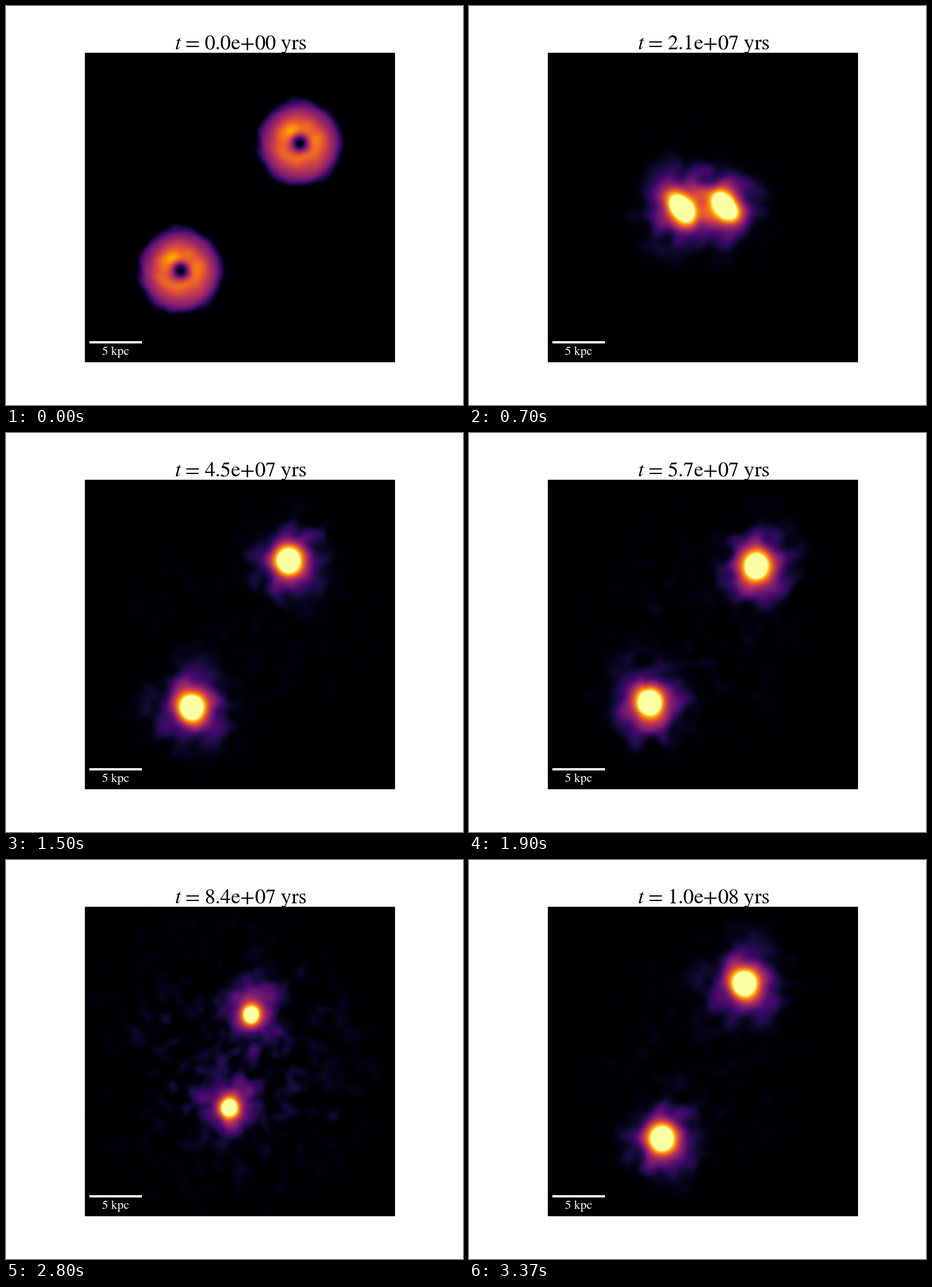
These frames come from a looping animation (800x700 px, 3530 ms). A matplotlib script:

```python
import numpy as np
import matplotlib.pyplot as plt
from matplotlib.animation import FuncAnimation

plt.rcParams["mathtext.fontset"] = "stix"

LOOP_MS, TICK_MS = 3530, 10
LEFT, TOP, SIDE = 138, 82, 543
CENTER = np.array([410.0, 353.0])

# Orbit: time in steps, lengths in pixels
FIRST_PASS, PERIOD = 7.35, 18.7
APOCENTRE, PERICENTRE = 157, 29
AXIS, PRECESSION = -128, -174.5

X, Y = np.meshgrid(LEFT + 0.5 + np.arange(SIDE), TOP + 0.5 + np.arange(SIDE))


def smooth_noise(seed, sigma):
    """Periodic noise with unit spread, smoothed over sigma pixels."""
    white = np.random.default_rng(seed).normal(size=(SIDE, SIDE))
    freq = np.fft.fftfreq(SIDE)
    decay = np.exp(-2 * (np.pi * sigma) ** 2 * (freq[:, None] ** 2 + freq ** 2))
    field = np.fft.ifft2(np.fft.fft2(white) * decay).real
    return field / field.std()


def noise_pair(seed, sigma):
    return smooth_noise(seed, sigma), smooth_noise(seed + 1, sigma)


DISK_NOISE = smooth_noise(4, 8)
HALO_NOISE = noise_pair(11, 10), noise_pair(21, 10)
HAZE_NOISE = noise_pair(31, 7)


def drift(pair, step, rate):
    return pair[0] * np.cos(rate * step) + pair[1] * np.sin(rate * step)


def follow(field, pos):
    col, row = np.round(pos - (LEFT, TOP)).astype(int)
    return np.roll(field, (row, col), (0, 1))


def passage(step):
    """Index of the nearest close pass and the time since it."""
    index = round((step - FIRST_PASS) / PERIOD)
    return index, step - FIRST_PASS - PERIOD * index


def orbit(step):
    """Offset of one galaxy from the centre; the other mirrors it."""
    index, tau = passage(step)
    swing = np.pi / 2 * abs(2 * tau / PERIOD) ** 0.7
    along = APOCENTRE * np.sign(tau) * np.sin(swing)
    across = PERICENTRE * np.cos(np.radians(8.5) * tau)
    phi = np.radians(AXIS + PRECESSION * index)
    return np.array([along * np.cos(phi) - across * np.sin(phi),
                     -along * np.sin(phi) - across * np.cos(phi)])


def disk(pos):
    """Young galaxy: a glowing ring around a dark hole."""
    n = follow(DISK_NOISE, pos)
    r = np.hypot(X - pos[0], Y - pos[1])
    r *= 1 + 0.025 * n * np.clip(r / 40, 0, 1)
    hole = np.exp(-(r / 16.5) ** 2)
    edge = 1 / (1 + np.exp((r - 73) / 3))
    return (0.84 + 0.06 * n) * np.exp(-(r / 66) ** 2) * (1 - hole) * edge


def core(pos, step, pair, squeeze):
    """Settled galaxy: saturated centre inside a ragged halo."""
    dx, dy = X - pos[0], (Y - pos[1]) / 1.1
    pull = 1 + 0.5 * np.exp(-((step - 7) / 1.2) ** 2)
    q = ((dx + dy) / pull) ** 2 / 2 + ((dx - dy) * pull ** 0.3) ** 2 / 2
    size = 21.5 * (1 - 0.36 * squeeze)
    n = np.clip(follow(drift(pair, step, 0.35), pos), -2, 2)
    reach = (46 - 6 * squeeze) * (1 + 0.13 * n)
    halo = (0.58 - 0.1 * squeeze) * np.exp(-(dx * dx + dy * dy) / reach ** 2)
    return 1.12 * np.exp(-q / size ** 2) + halo


def render(step):
    offset = orbit(step)
    squeeze = np.exp(-((passage(step)[1] - 1.5) / 1.6) ** 2)
    u = min(step / 7, 1)
    settled = u * u * (3 - 2 * u)

    clumps = np.clip(drift(HAZE_NOISE, step, 0.5) + 0.6, 0, None)
    spread = np.exp(-((X - CENTER[0]) ** 2 + (Y - CENTER[1]) ** 2) / 190 ** 2)
    density = settled ** 4 * (0.014 + 0.036 * squeeze) * clumps * spread
    if step <= 7:
        density *= u ** 8 * 0.2
    for sign, pair in zip((1, -1), HALO_NOISE):
        pos = CENTER + sign * offset
        density += (1 - settled) * disk(pos)
        density += settled * core(pos, step, pair, squeeze)
    return plt.cm.inferno(np.clip(density, 0, 1), bytes=True)


def step_at(ms):
    return 33.7 if ms >= 3370 else min(ms // 100, 32)


def label(step):
    value = f"{step * 3e6:.1e}".replace("+", "{+}")
    return rf"$\mathrm{{{value}\ yrs}}$"


fig = plt.figure(figsize=(8, 7), dpi=100, facecolor="white")
ax = fig.add_axes([0, 0, 1, 1])
ax.axis("off")

pictures = {0: render(0)}
image = ax.imshow(pictures[0], extent=(LEFT, LEFT + SIDE, TOP + SIDE, TOP),
                  interpolation="nearest", aspect="auto")
ax.set(xlim=(0, 800), ylim=(700, 0))


def write(x, y, text, pixels, **style):
    return ax.text(x, y, text, fontsize=pixels * 0.72, va="baseline", **style)


write(295, 76.5, r"$t\hspace{0.1}=$", 37)
clock = write(347, 76.5, label(0), 37)
ax.add_patch(plt.Rectangle((146, 588), 92, 4, fc="white", lw=0))
write(192, 612, r"$\mathrm{5\ kpc}$", 22, color="white", ha="center")


def update(i):
    step = step_at(i * TICK_MS)
    if step not in pictures:
        pictures[step] = render(step)
    image.set_data(pictures[step])
    clock.set_text(label(step))
    return image, clock


anim = FuncAnimation(fig, update, frames=LOOP_MS // TICK_MS, interval=TICK_MS,
                     repeat=True, repeat_delay=0)
plt.show()
```
